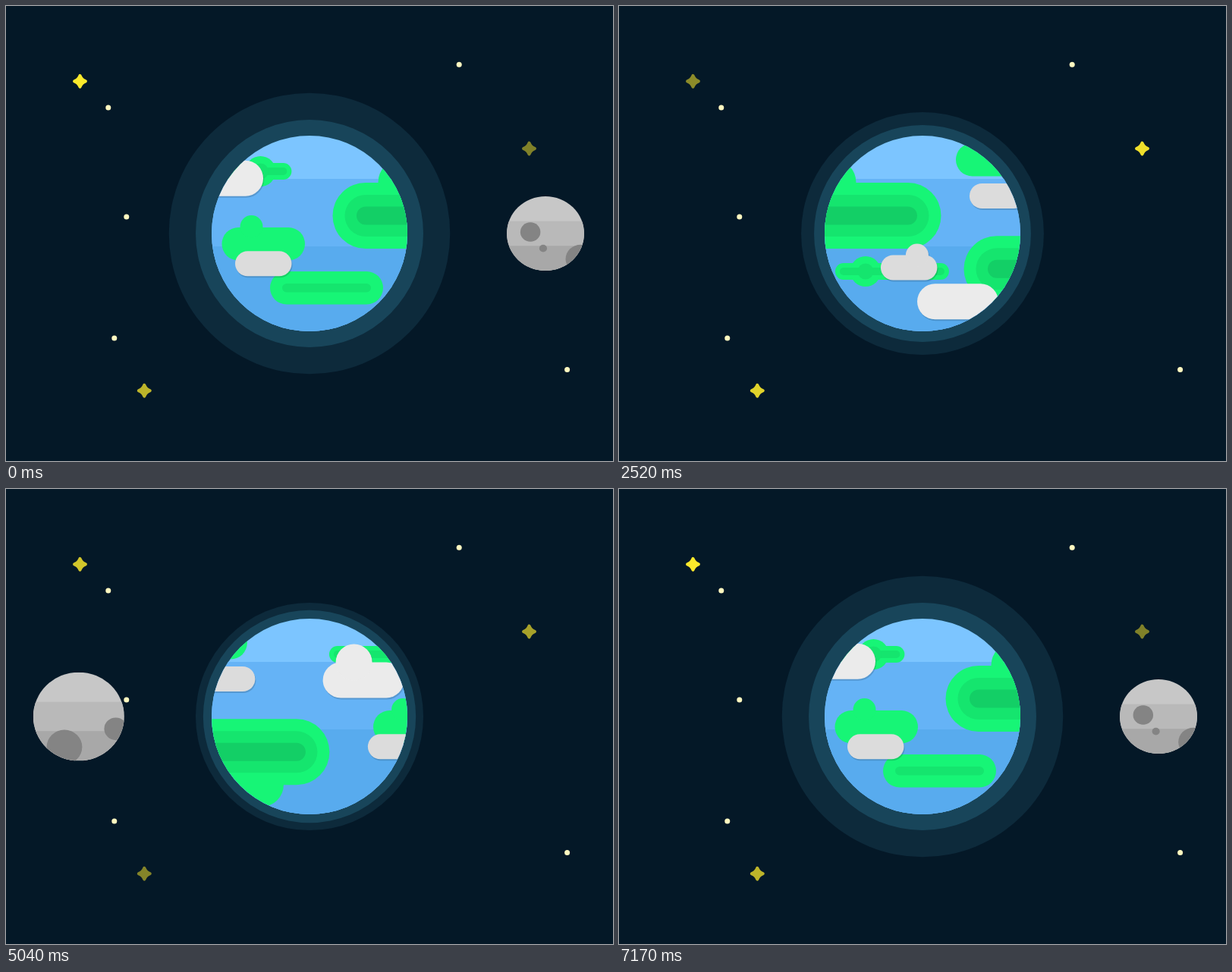
Animation of 800x600 px, one loop 7200 ms. Source, as an HTML page:

```html
<!DOCTYPE html>
<html lang="en">
<head>
<meta charset="utf-8">
<title>Earth and Moon</title>
<style>
  html, body { margin: 0; width: 100%; height: 100%; overflow: hidden; background: #041827; }
  svg { display: block; width: 100vw; height: 100vh; }
</style>
</head>
<body>
<svg viewBox="0 0 800 600">
  <defs>
    <clipPath id="globe"><circle cx="400" cy="300" r="129"/></clipPath>
    <clipPath id="disc"><circle r="1"/></clipPath>
  </defs>
  <g id="stars"></g>
  <g id="halo" fill="#4ac0e8">
    <circle id="outer" cx="400" cy="300" fill="#5abee6" fill-opacity=".1"/>
    <circle id="inner" cx="400" cy="300" fill-opacity=".18"/>
  </g>
  <g clip-path="url(#globe)">
    <path d="M270 170h260v260h-260z" fill="#7cc5ff"/>
    <path d="M270 228h260v202h-260z" fill="#65b3f6"/>
    <path d="M270 317h260v113h-260z" fill="#58abee"/>
    <g id="land"></g>
    <g id="smallClouds"></g>
    <g id="bigClouds"></g>
  </g>
  <g id="moon">
    <g clip-path="url(#disc)">
      <path d="M-1-1h2v2h-2z" fill="#c7c7c7"/>
      <path d="M-1-.33h2v1.33h-2z" fill="#b9b9b9"/>
      <path d="M-1 .33h2v.67h-2z" fill="#a8a8a8"/>
      <g id="craters" fill="#848484"></g>
    </g>
  </g>
</svg>
<script>
const el = id => document.getElementById(id);
const svg = document.querySelector('svg');
const GREEN = ['#17f576', '#15e56e', '#13cf66'];
const LOOP = 7200, STEP = 30, LAST = LOOP - STEP;

const circle = (x, y, r, fill = '') =>
  `<circle cx="${x}" cy="${y}" r="${r}" ${fill && `fill="${fill}"`}/>`;
const pill = (x, y, w, h, fill = '') =>
  `<rect x="${x}" y="${y}" width="${w}" height="${h}" rx="${h / 2}" ${fill && `fill="${fill}"`}/>`;
const insetPill = (x, y, w, h, d, fill) => pill(x + d, y + d, w - 2 * d, h - 2 * d, fill);

// Repeats a strip on both sides so that it can scroll endlessly.
const tile = (width, body) =>
  [-1, 0, 1].map(k => `<g transform="translate(${k * width})">${body}</g>`).join('');

const continent = (x, y, w, bumpX, bumpY) =>
  circle(bumpX, bumpY, 29, GREEN[0]) + pill(x, y, w, 87, GREEN[0]) +
  insetPill(x, y, w, 87, 16, GREEN[1]) + insetPill(x, y, w, 87, 31.5, GREEN[2]);

const ridge = (x, y, bumpX) =>
  pill(x, y, 150, 22, GREEN[0]) + circle(bumpX, y + 11, 20, GREEN[0]) +
  insetPill(x, y, 150, 22, 6, GREEN[1]) + circle(bumpX, y + 11, 10.5, GREEN[1]);

function cloud(x, y, w, h, fill, bumpX, bumpR) {
  const shape = pill(x, y, w, h) + (bumpR ? circle(x + bumpX, y, bumpR) : '');
  return `<g opacity=".15" transform="translate(1 2)">${shape}</g><g fill="${fill}">${shape}</g>`;
}
const bigCloud = (x, y, bumpX) => cloud(x, y, 107, 47, '#ebebeb', bumpX, bumpX ? 24 : 0);
const smallCloud = (x, y, bumpX) => cloud(x, y, 74.5, 33, '#dcdcdc', bumpX, bumpX ? 15 : 0);

const strips = [
  { id: 'land', width: 671.6, travel: 671.6, body:
    continent(430.5, 233, 230, 519.5, 232) +
    continent(690.5, 303.3, 208, 809, 390) +
    pill(680, 181, 110, 43.5, GREEN[0]) +
    pill(284.5, 292, 109.5, 43.5, GREEN[0]) + circle(323.5, 291, 15, GREEN[0]) +
    pill(348, 350, 149, 43.5, GREEN[0]) + insetPill(348, 350, 149, 43.5, 16, GREEN[1]) +
    ridge(898, 207, 1007) + ridge(521, 339, 561) },
  { id: 'smallClouds', width: 591, travel: 592, body:
    smallCloud(302, 323.3) + smallCloud(553, 328.5, 48) + smallCloud(670, 234) },
  { id: 'bigClouds', width: 1324, travel: 1325, body:
    bigCloud(232, 203.7) + bigCloud(577.5, 251.3, 42) + bigCloud(858.7, 366.3) +
    bigCloud(1002.7, 180.5) + bigCloud(1349, 228.5, 41) }
];
for (const s of strips) el(s.id).innerHTML = tile(s.width, s.body);

// x along the surface, y, radius, in moon radii
const craters = [
  [-1.665, .68, .41], [0, -.04, .26], [.33, .4, .1], [1.3, .69, .39],
  [2.43, .28, .255], [2.83, .78, .1], [3.79, -.585, .36], [3.9, .51, .29],
  [6.485, .68, .41], [8.15, -.04, .26]
];
el('craters').innerHTML = craters.map(c => circle(...c)).join('');

const dots = [[597.2, 77.2], [134.8, 134], [158.8, 278], [142.8, 438], [739.6, 479.6]];
const sparkles = [[97.5, 99.2], [689.5, 188], [182.3, 507.3]];
el('stars').innerHTML =
  dots.map(([x, y]) => circle(x, y, 3.5, '#fff8c0')).join('') +
  sparkles.map(([x, y]) => `<g class="sparkle" transform="translate(${x} ${y})">
    <path d="M0-7.3Q2-2 7.3 0Q2 2 0 7.3Q-2 2-7.3 0Q-2-2 0-7.3Z" fill="#fbe92c"
      stroke="#fbe92c" stroke-width="4.2" stroke-linejoin="round"/></g>`).join('');
const sparkleEls = document.querySelectorAll('.sparkle');

function drawMoon(t, angle) {
  const cos = Math.cos(angle), sin = Math.sin(angle);
  const scale = 1 / (1 - .281 * sin);
  const r = 49 * scale;
  el('moon').setAttribute('transform',
    `translate(${400 + 311 * cos * scale} 300) scale(${r * (1 + .04 * cos * cos)} ${r})`);
  svg.insertBefore(el('moon'), sin >= 0 ? null : el('halo'));
  // The surface rewinds while the moon is hidden behind the earth.
  const rewind = t > 6300 ? 13.33 : t > 2700 ? 8.15 : 0;
  el('craters').setAttribute('transform', `translate(${rewind - .39 - .00186 * t})`);
}

function draw(t) {
  const half = LOOP / 2;
  const turns = t < half ? t / half : 1 + (t - half) / (LAST - half);
  const angle = turns * 2 * Math.PI;

  const shrink = 1 - Math.cos(angle);
  el('outer').setAttribute('r', 185.3 - 19.35 * shrink);
  el('inner').setAttribute('r', 150 - 5.4 * shrink);

  for (const s of strips)
    el(s.id).setAttribute('transform', `translate(${-s.travel * t / LAST})`);

  const glow = [Math.cos(2 * angle), -Math.cos(2 * angle), Math.sin(2 * angle)];
  sparkleEls.forEach((e, i) => e.setAttribute('opacity', .75 + .25 * glow[i]));

  drawMoon(t, angle);
}

const start = performance.now();
function tick() {
  const t = (performance.now() - start) % LOOP;
  draw(Math.floor(t / STEP) * STEP);
  requestAnimationFrame(tick);
}
tick();
</script>
</body>
</html>
```
